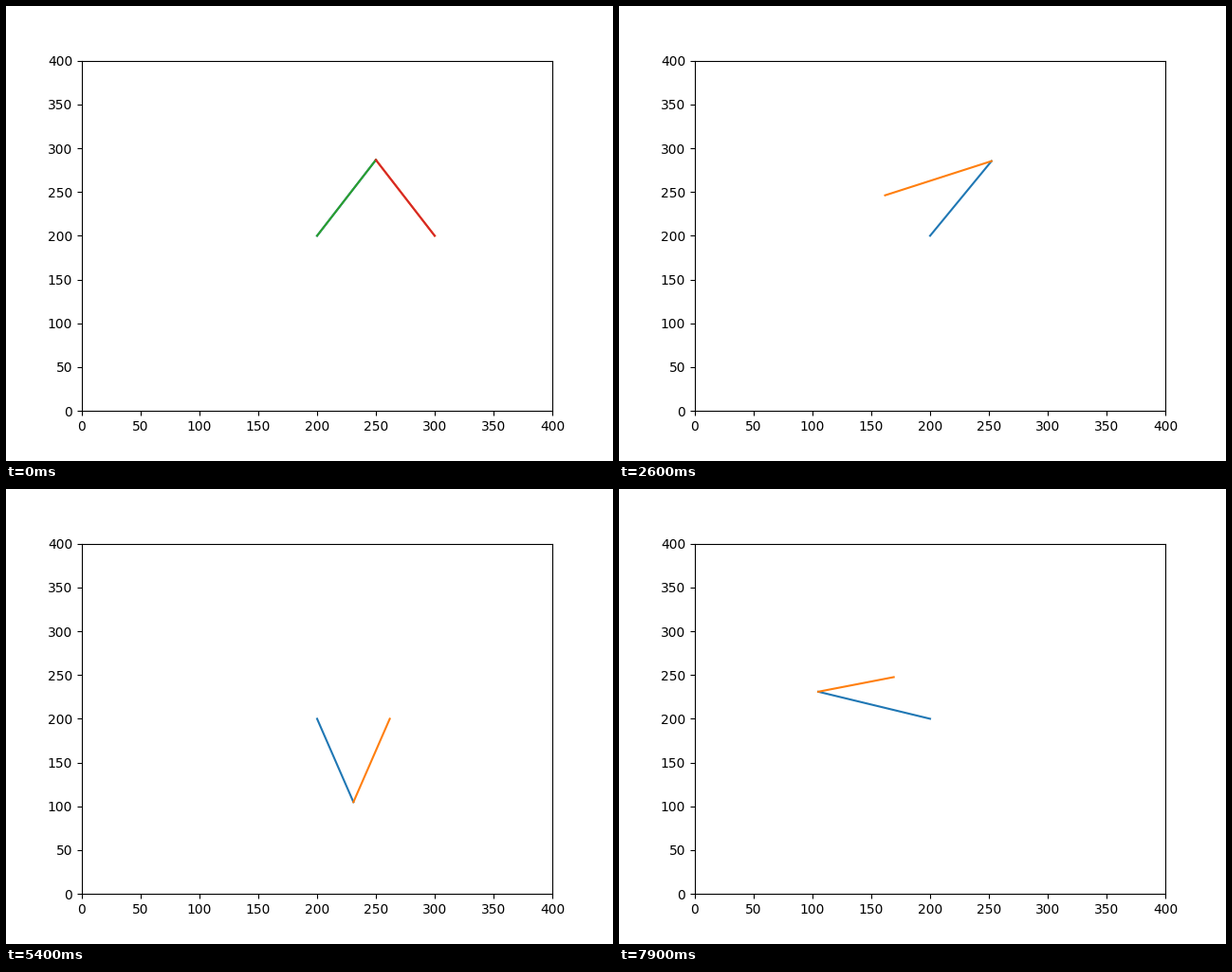
Animation of 640x480 px, one loop 8000 ms. Source, as a matplotlib script:

```python
import numpy as np
import matplotlib.pyplot as plt
from matplotlib.animation import FuncAnimation

FRAMES, INTERVAL = 80, 100
HIP = np.array([200.0, 200.0])
THIGH = 100
LEAD_IN = 11                 # steps of the first, shortened stance
SWING, STANCE = 40, 12       # steps per phase
SWING_RATE, STANCE_RATE = 4.5, 6.0   # degrees per step
TURN = SWING * SWING_RATE + STANCE * STANCE_RATE


def polar(deg):
    a = np.radians(deg)
    return np.array([np.cos(a), np.sin(a)])


def pose(n):
    """Return the knee and foot positions at step n."""
    swinging = False
    if n < LEAD_IN:
        angle = 60 + STANCE_RATE * n
    else:
        cycle, k = divmod(n - LEAD_IN, SWING + STANCE)
        angle = 126 - TURN * cycle
        swinging = k < SWING
        if swinging:
            angle -= SWING_RATE * k
        else:
            angle -= SWING * SWING_RATE + STANCE_RATE * (k - SWING)
    knee = HIP + THIGH * polar(angle)
    if swinging:
        # The foot is lifted forward along a half ellipse.
        foot = HIP + np.array([-100, 50]) * polar(SWING_RATE * k)
    else:
        # The foot slides along the ground below an isosceles leg.
        foot = np.array([2 * knee[0] - HIP[0], HIP[1]])
    return knee, foot


def set_segment(line, p, q):
    line.set_data([p[0], q[0]], [p[1], q[1]])


fig, ax = plt.subplots(figsize=(6.4, 4.8), dpi=100)
ax.set_xlim(0, 400)
ax.set_ylim(0, 400)

thigh, shin = (ax.plot([], [])[0] for _ in range(2))
start_knee, start_foot = pose(0)
start_lines = [
    ax.plot(*zip(HIP, start_knee))[0],
    ax.plot(*zip(start_knee, start_foot))[0],
]


def update(n):
    knee, foot = pose(n)
    set_segment(thigh, HIP, knee)
    set_segment(shin, knee, foot)
    for line in start_lines:
        line.set_visible(n == 0)
    return [thigh, shin, *start_lines]


anim = FuncAnimation(fig, update, frames=FRAMES, interval=INTERVAL,
                     init_func=lambda: update(0), repeat=True,
                     repeat_delay=0, blit=False)
plt.show()
```
